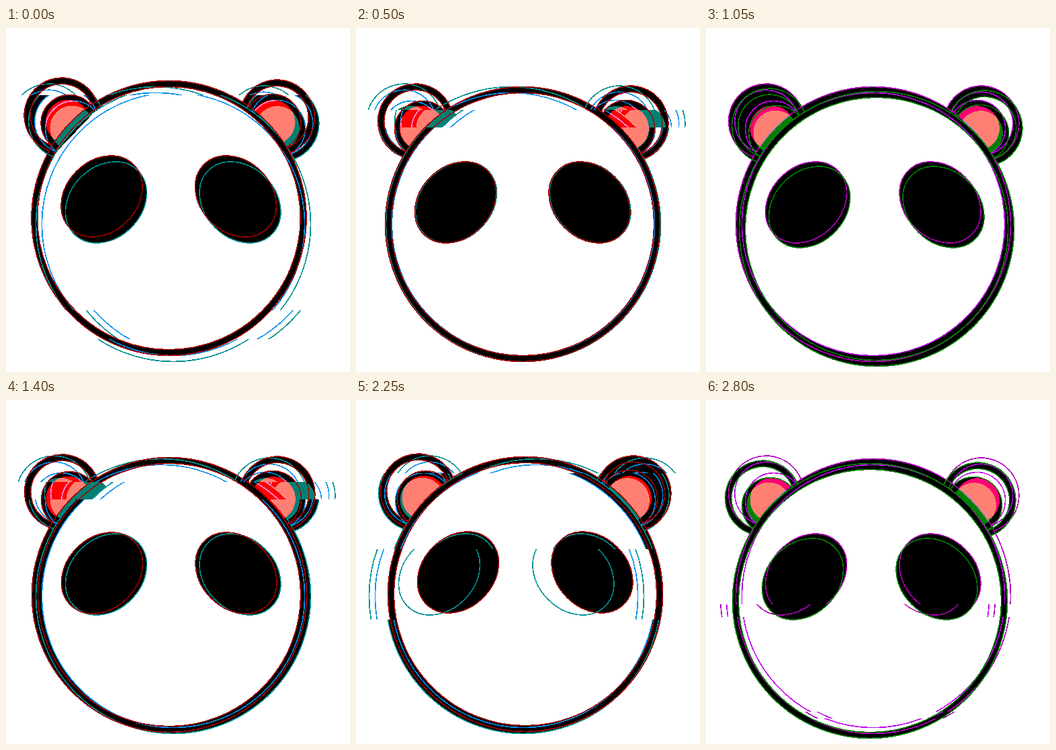
Write an HTML page without scripts that moves like this. It is 512x512 px and loops after 2850 ms.

```html
<!DOCTYPE html>
<html lang="en">
<head>
<meta charset="utf-8">
<title>Glitching panda</title>
<style>
html, body { margin: 0; width: 100%; height: 100%; overflow: hidden; background: #fff; }
body > svg { display: block; width: 100vw; height: 100vh; shape-rendering: crispEdges; }

/* One colour channel is shifted: --a/--q colour it, --o/--n/--p colour the other two */
.r { --a: #a00000; --q: #f00; --o: #009090; --n: #0090f0; --p: #008073; }
.g { --a: #008000; --q: #008000; --o: #b000b8; --n: #c000f0; --p: #ff0073; }
.b { --a: #0000b0; --q: #000073; --o: #b0a800; --n: #d09000; --p: #ff8000; }

/* Fills: h head ring, e/f eyes, l/k ears, gl/gr ear gaps */
.a {
  --o: var(--a); --n: var(--a); --p: var(--q);
  --h: #000; --e: #000; --f: #000; --l: #000; --k: #000;
  animation: jitter 2.85s step-end infinite;
}
.lit { mix-blend-mode: screen; }
.torn { --h: none; --e: none; --f: none; --l: none; --k: none; --gl: none; --gr: none; }

#fill, #rim { fill: none; }
#fill .band { stroke-width: 9; }
#pink { fill: var(--p); }
#rim { stroke: var(--n); stroke-width: 1.6; }
#rim .out { stroke: var(--o); }

.strip { animation: strip 2.85s step-end infinite; }
@keyframes strip {
  0%, 14.03%, 28.07%, 43.85%, 57.89%, 71.92%, 82.45%, 92.98% { transform: translateX(0); }
  8.77%, 24.56%, 36.84%, 47.36%, 56.14%, 64.91%, 77.19%, 91.22% { transform: translateX(-512px); }
  3.5%, 12.28%, 21.05%, 26.31%, 33.33%, 40.35%, 50.87%, 59.64%, 66.66%, 73.68%, 80.7%, 87.71%, 96.49% { transform: translateX(-1024px); }
  7.01%, 17.54%, 35.08%, 49.12%, 63.15%, 85.96% { transform: translateX(-1536px); }
  1.75%, 19.29%, 29.82%, 45.61%, 61.4%, 75.43%, 89.47% { transform: translateX(-2048px); }
  10.52%, 22.8%, 38.59%, 54.38%, 68.42%, 78.94%, 94.73% { transform: translateX(-2560px); }
  5.26%, 15.78%, 31.57%, 42.1%, 52.63%, 70.17%, 84.21%, 98.24% { transform: translateX(-3072px); }
}
@keyframes jitter {
  0%, 8.77%, 26.31%, 49.12%, 61.4%, 78.94%, 98.24% { translate: 0 0; }
  1.75%, 17.54%, 40.35%, 70.17%, 91.22% { translate: 5px 2px; }
  5.26%, 22.8%, 35.08%, 54.38%, 85.96% { translate: -2px -2px; }
  10.52%, 28.07%, 45.61%, 63.15%, 80.7% { translate: 3px -1px; }
}
</style>
</head>
<body>
<svg viewBox="0 0 512 512">
  <defs>
    <ellipse id="eyeL" rx="67" ry="53" transform="translate(149 259.5) rotate(-45)"/>
    <ellipse id="eyeR" rx="67" ry="53" transform="translate(348.5 259.5) rotate(45)"/>
    <path id="cupL" d="M75.3 184.1A42 42 0 1 1 132.9 123.7"/>
    <path id="cupR" d="M368.6 126.2A42 42 0 1 1 424 186.2"/>

    <g id="fill">
      <path class="band" d="M73 187.9A51.5 51.5 0 1 1 137.6 120.5" style="fill:var(--gl,none);stroke:var(--l,none)"/>
      <path class="band" d="M362.5 121.8A51.5 51.5 0 1 1 426.7 190.8" style="fill:var(--gr,none);stroke:var(--k,none)"/>
      <use href="#cupL" style="fill:var(--l,none)"/>
      <use href="#cupR" style="fill:var(--k,none)"/>
      <circle class="band" cx="249" cy="292" r="200.2" style="stroke:var(--h,none)"/>
      <use href="#eyeL" style="fill:var(--e,none)"/>
      <use href="#eyeR" style="fill:var(--f,none)"/>
    </g>

    <g id="pink">
      <path d="M80.4 176.2A33 33 0 1 1 125.2 129.2A204.5 204.5 0 0 0 80.4 176.2Z"/>
      <path d="M375.9 131.7A33 33 0 1 1 419.1 178.5A204.5 204.5 0 0 0 375.9 131.7Z"/>
    </g>

    <g id="rim">
      <path class="out" d="M70.7 191.8A56 56 0 1 1 141.5 118"/>
      <path class="out" d="M358.7 119.4A56 56 0 1 1 428.9 194.8"/>
      <path d="M75.4 184A47 47 0 1 1 133.8 123"/>
      <path d="M366.2 124.5A47 47 0 1 1 424.4 186.9"/>
      <use href="#cupL"/>
      <use href="#cupR"/>
      <circle class="out" cx="249" cy="292" r="204.5"/>
      <circle cx="249" cy="292" r="195.7"/>
      <use class="out" href="#eyeL"/>
      <use class="out" href="#eyeR"/>
    </g>

    <g id="still">
      <use href="#fill"/>
      <use href="#pink"/>
      <use href="#rim"/>
    </g>
  </defs>

  <g class="strip">
    <g class="r" style="--e:#000;--f:#000;--l:#000;--k:#000">
      <use class="a" href="#fill" transform="translate(-6.5 -9)"/>
      <svg class="torn" x="-26" y="0" width="512" height="100" viewBox="0 0 512 100"><use href="#still"/></svg>
      <svg y="100" width="512" height="320" viewBox="0 100 512 320"><use href="#still"/></svg>
      <svg class="torn" x="30" y="420" width="512" height="43" viewBox="0 420 512 43"><use href="#still"/></svg>
      <svg y="463" width="512" height="49" viewBox="0 463 512 49"><use href="#still"/></svg>
      <use class="a lit" href="#pink" transform="translate(-6.5 -9)"/>
      <use class="a" href="#rim" transform="translate(-6.5 -9)"/>
    </g>

    <g class="g" transform="translate(512)" style="--h:#000;--e:#000;--f:#000;--l:#000;--k:#000;--gl:#000">
      <use class="a" href="#fill" transform="translate(7 9)"/>
      <use href="#still"/>
      <use class="a lit" href="#pink" transform="translate(7 9)"/>
      <use class="a" href="#rim" transform="translate(7 9)"/>
    </g>

    <g class="b" transform="translate(1024)" style="--f:#000;--l:#000;--gl:#000">
      <use class="a" href="#fill" transform="translate(-6 -6)"/>
      <svg y="0" width="512" height="318" viewBox="0 0 512 318"><use href="#still"/></svg>
      <svg class="torn" x="-7" y="318" width="512" height="32" viewBox="0 318 512 32"><use href="#still"/></svg>
      <svg y="350" width="512" height="162" viewBox="0 350 512 162"><use href="#still"/></svg>
      <use class="a lit" href="#pink" transform="translate(-6 -6)"/>
      <use class="a" href="#rim" transform="translate(-6 -6)"/>
    </g>

    <g class="r" transform="translate(1536)" style="--h:#000;--e:#000;--f:#000;--k:#000">
      <use class="a" href="#fill" transform="translate(-6 -2)"/>
      <svg class="torn" x="-18" y="0" width="512" height="122" viewBox="0 0 512 122"><use href="#still"/></svg>
      <svg class="torn" x="24" y="122" width="512" height="26" viewBox="0 122 512 26"><use href="#still"/></svg>
      <svg y="148" width="512" height="364" viewBox="0 148 512 364"><use href="#still"/></svg>
      <use class="a lit" href="#pink" transform="translate(-6 -2)"/>
      <use class="a" href="#rim" transform="translate(-6 -2)"/>
    </g>

    <g class="g" transform="translate(2048)" style="--h:#000;--l:#000;--k:#000;--gr:#000">
      <use class="a" href="#fill" transform="translate(2 -7)"/>
      <svg y="0" width="512" height="238" viewBox="0 0 512 238"><use href="#still"/></svg>
      <svg class="torn" x="-22" y="238" width="512" height="29" viewBox="0 238 512 29"><use href="#still"/></svg>
      <svg class="torn" x="-14" y="267" width="512" height="70" viewBox="0 267 512 70"><use href="#still"/></svg>
      <svg y="337" width="512" height="175" viewBox="0 337 512 175"><use href="#still"/></svg>
      <use class="a lit" href="#pink" transform="translate(2 -7)"/>
      <use class="a" href="#rim" transform="translate(2 -7)"/>
    </g>

    <g class="r" transform="translate(2560)" style="--h:#000;--l:#000;--k:#000;--gr:#000">
      <use class="a" href="#fill" transform="translate(3 -3)"/>
      <svg class="torn" x="20" y="0" width="512" height="109" viewBox="0 0 512 109"><use href="#still"/></svg>
      <svg y="109" width="512" height="113" viewBox="0 109 512 113"><use href="#still"/></svg>
      <svg class="torn" x="-25" y="222" width="512" height="105" viewBox="0 222 512 105"><use href="#still"/></svg>
      <svg y="327" width="512" height="185" viewBox="0 327 512 185"><use href="#still"/></svg>
      <use class="a lit" href="#pink" transform="translate(3 -3)"/>
      <use class="a" href="#rim" transform="translate(3 -3)"/>
    </g>

    <g class="g" transform="translate(3072)" style="--e:#000;--f:#000">
      <use class="a" href="#fill" transform="translate(-5 7)"/>
      <svg y="0" width="512" height="200" viewBox="0 0 512 200" style="--h:#000"><use href="#still"/></svg>
      <svg y="200" width="512" height="104" viewBox="0 200 512 104"><use href="#still"/></svg>
      <svg class="torn" x="-23" y="304" width="512" height="19" viewBox="0 304 512 19"><use href="#still"/></svg>
      <svg y="323" width="512" height="141" viewBox="0 323 512 141"><use href="#still"/></svg>
      <svg class="torn" x="10" y="464" width="512" height="10" viewBox="0 464 512 10"><use href="#still"/></svg>
      <svg y="474" width="512" height="38" viewBox="0 474 512 38"><use href="#still"/></svg>
      <use class="a lit" href="#pink" transform="translate(-5 7)"/>
      <use class="a" href="#rim" transform="translate(-5 7)"/>
    </g>
  </g>
</svg>
</body>
</html>
```
